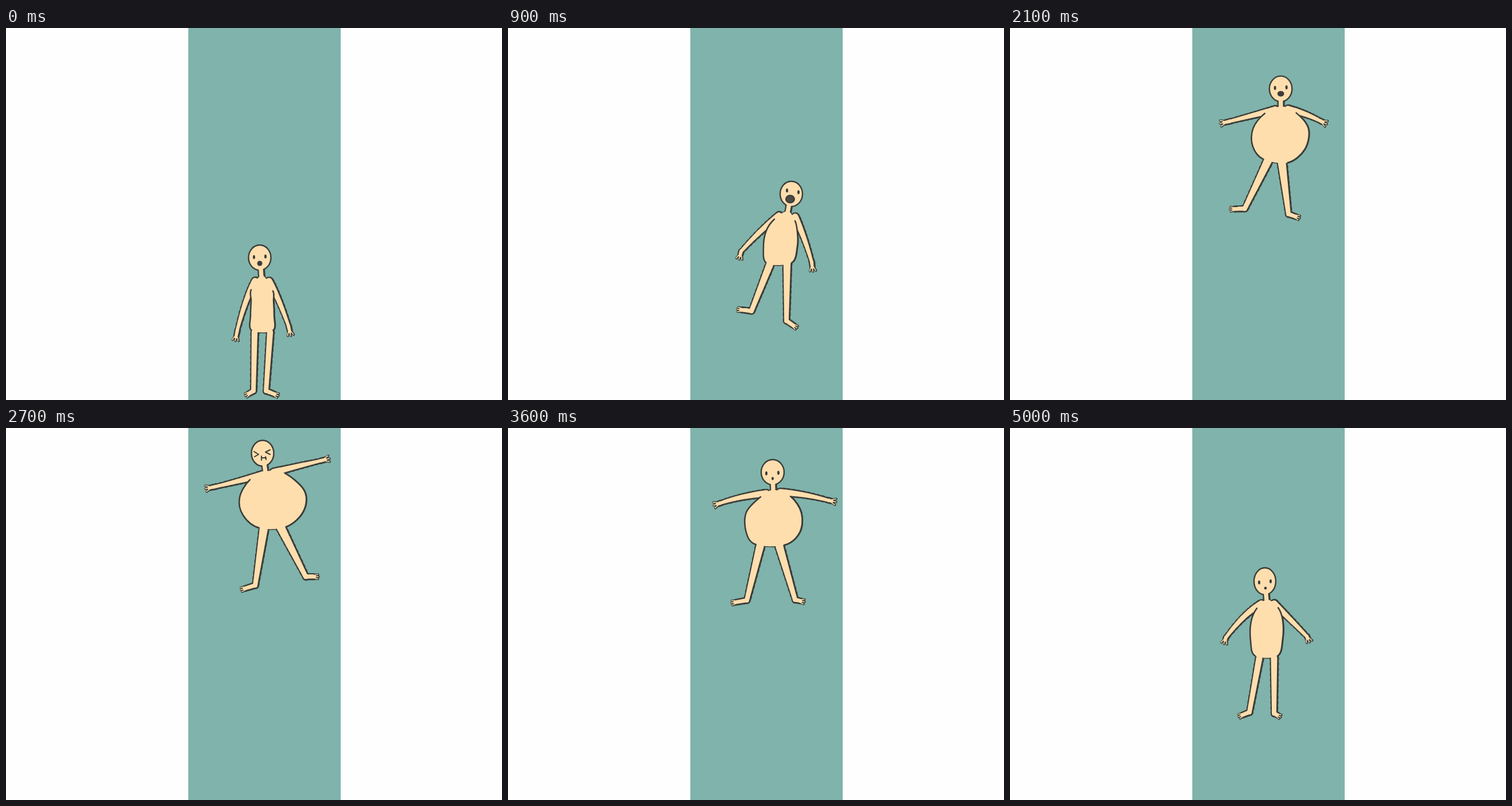
Write an HTML page with a canvas that moves like this. It is 864 by 648 pixels and loops after 5.1 s.

```html
<!DOCTYPE html>
<html lang="en">
<head>
<meta charset="utf-8">
<title>Floating up</title>
<style>
html, body { margin: 0; width: 100%; height: 100%; overflow: hidden; background: #fffeff; }
canvas { display: block; }
</style>
</head>
<body>
<canvas id="stage" width="864" height="648"></canvas>
<script>
const ctx = document.getElementById('stage').getContext('2d');
const PAPER = '#fffeff', TEAL = '#7fb3ab', SKIN = '#ffdeae', INK = '#3b3d39';
const HOLD = 300, LOOP = 5100, EDGE = 1.3;

// torso: top, left pit, left side, left low, left hip, then mirrored upwards
// arms: shoulder, bend, wrist, fingertips; legs: hip, ankle, toes
const stand = {
  head: [442, 400, 19.5, 22], eyes: [432, 399, 452, 398], mouth: [442, 410, 4.5, 4.5], neck: [445, 432],
  torso: [446, 431, 427, 456, 427, 475, 426, 500, 428, 527, 465, 527, 467, 500, 466, 475, 465, 458],
  armL: [434, 441, 417, 470, 403, 526, 399, 546], armR: [458, 441, 474, 467, 492, 519, 496, 537],
  legL: [433, 530, 431, 632, 416, 641], legR: [460, 530, 453, 632, 475, 641], hip: [6.5]
};
const lean = {
  head: [493.5, 289, 19.5, 22], eyes: [486, 283, 506, 286], mouth: [491.5, 298, 8.5, 7.5], neck: [487, 320],
  torso: [487, 319, 464, 333, 450, 353, 445, 382, 451, 410, 494, 409, 504, 380, 504, 355, 500, 336],
  armL: [472, 327, 442, 349, 406, 389, 402, 404], armR: [500, 329, 516, 362, 529, 408, 531, 425],
  legL: [456, 412, 424, 493, 398, 490], legR: [486, 412, 485, 510, 504, 523], hip: [7.5]
};
const tilt = {
  head: [505.5, 191.5, 20, 22], eyes: [497, 185, 517, 188], mouth: [503, 201, 8.5, 7.5], neck: [499, 222],
  torso: [495, 222, 470, 230, 446, 250, 436, 280, 442, 304, 478, 321, 507, 303, 520, 267, 516, 243],
  armL: [482, 227, 455, 232, 408, 246, 391, 250], armR: [509, 230, 525, 259, 533, 308, 536, 326],
  legL: [450, 308, 374, 371, 346, 362], legR: [466, 318, 434, 414, 450, 431], hip: [8]
};
const ball = {
  head: [447, 44, 19.5, 22.5], eyes: [436, 46, 456, 42], mouth: [449, 52, 4, 3], neck: [452, 75],
  torso: [456, 75, 425, 90, 407, 121, 413, 152, 441, 174, 488, 172, 518, 145, 520, 110, 486, 79],
  armL: [447, 81, 412, 91, 365, 102, 346, 106], armR: [466, 77, 505, 67, 548, 57, 564, 53],
  legL: [449, 175, 434, 274, 408, 282], legR: [479, 174, 522, 259, 545, 259], hip: [8.5]
};
const star = {
  head: [461, 77, 20, 22], eyes: [450, 79, 471, 78], mouth: [461, 88, 2, 2.8], neck: [462, 107],
  torso: [462, 108, 440, 120, 415, 147, 415, 182, 432, 203, 481, 204, 508, 182, 511, 148, 492, 119],
  armL: [450, 114, 407, 118, 369, 131, 357, 135], armR: [474, 112, 515, 114, 558, 126, 572, 129],
  legL: [439, 206, 416, 300, 388, 305], legR: [473, 207, 500, 299, 517, 303], hip: [8]
};
const drop = {
  head: [452.5, 169, 19.5, 23], eyes: [442, 171, 463, 169], mouth: [453, 181, 2.8, 2.5], neck: [456, 201],
  torso: [456, 201, 437, 216, 421, 242, 421, 275, 438, 300, 479, 299, 494, 272, 495, 241, 479, 214],
  armL: [446, 208, 412, 226, 371, 252, 361, 262], armR: [469, 207, 495, 219, 532, 254, 538, 267],
  legL: [446, 304, 419, 395, 394, 402], legR: [471, 303, 484, 399, 503, 407], hip: [8]
};
const land = {
  head: [444, 267, 19, 23.5], eyes: [434, 269, 454, 267], mouth: [445, 279, 2.4, 2.4], neck: [447, 299],
  torso: [448, 299, 430, 314, 420, 337, 419, 370, 427, 397, 466, 397, 475, 367, 475, 335, 467, 313],
  armL: [438, 306, 408, 322, 376, 365, 372, 377], armR: [460, 306, 484, 329, 517, 363, 522, 374],
  legL: [434, 402, 417, 495, 397, 503], legR: [460, 401, 460, 497, 472, 504], hip: [6.8]
};

// from, to, blend, shift x, shift y
const beats = [
  [stand], [stand, lean, .18, -4], [stand, lean, .44, -13],
  [lean], [lean, tilt, .5],
  [tilt], [tilt, ball, .27], [tilt, ball, .58], [tilt, ball, .87],
  [ball], [ball, star, .2, 0, -9], [ball, star, .6, 0, -8],
  [star], [star, drop, .5],
  [drop], [drop, land, .5],
  [land]
];

function blend(a, b, k) {
  const pose = {};
  for (const part in a) pose[part] = a[part].map((v, i) => v + (b[part][i] - v) * k);
  return pose;
}

function ellipse(x, y, rx, ry) {
  ctx.beginPath();
  ctx.ellipse(x, y, rx, ry, 0, 0, Math.PI * 2);
}

function line(...xy) {
  ctx.beginPath();
  for (let i = 0; i < xy.length; i += 2) ctx.lineTo(xy[i], xy[i + 1]);
  ctx.stroke();
}

// Tapered, slightly uneven quadratic limb
function limb(x0, y0, cx, cy, x1, y1, r0, r1, grow) {
  ctx.beginPath();
  for (let i = 0; i <= 70; i++) {
    const t = i / 70, u = 1 - t;
    const x = u * u * x0 + 2 * u * t * cx + t * t * x1;
    const y = u * u * y0 + 2 * u * t * cy + t * t * y1;
    const rough = grow > 0 ? .3 * Math.sin(i * .9 + x0) : 0;
    const r = r0 + (r1 - r0) * t + grow + rough;
    ctx.moveTo(x + r, y);
    ctx.arc(x, y, r, 0, Math.PI * 2);
  }
  ctx.fill();
}

function straight(x0, y0, x1, y1, r0, r1, grow) {
  limb(x0, y0, (x0 + x1) / 2, (y0 + y1) / 2, x1, y1, r0, r1, grow);
}

// Palm or sole ending in three digits
function digits(x0, y0, x1, y1, r, spread, grow) {
  const len = Math.hypot(x1 - x0, y1 - y0);
  const ux = (x1 - x0) / len, uy = (y1 - y0) / len;
  const reach = Math.max(len - 8, 2);
  const bx = x0 + ux * reach, by = y0 + uy * reach;
  straight(x0, y0, bx, by, r, r - .4, grow);
  ctx.lineWidth = grow > 0 ? 4.2 : 1.5;
  for (const side of [-1, 0, 1]) {
    const a = side * 2.6, b = side * spread, tip = 7 - Math.abs(side);
    line(bx - uy * a, by + ux * a, bx + ux * tip - uy * b, by + uy * tip + ux * b);
  }
}

function arm(a, grow) {
  limb(a[0], a[1], a[2], a[3], a[4], a[5], 7, 4, grow);
  digits(a[4], a[5], a[6], a[7], 4.3, 5.2, grow);
}

function leg(l, hip, grow) {
  straight(l[0], l[1], l[2], l[3], hip, 5.2, grow);
  digits(l[2], l[3], l[4], l[5], 4.8, 3.8, grow);
}

// Smooth closed curve, or the part of it between two of its points
function curve(p, first = 0, last = p.length / 2) {
  const n = p.length / 2;
  const at = i => { const j = (i + n) % n * 2; return [p[j], p[j + 1]]; };
  ctx.beginPath();
  ctx.moveTo(...at(first));
  for (let i = first; i < last; i++) {
    const [a, b, c, d] = [at(i - 1), at(i), at(i + 1), at(i + 2)];
    ctx.bezierCurveTo(b[0] + (c[0] - a[0]) / 6, b[1] + (c[1] - a[1]) / 6,
      c[0] - (d[0] - b[0]) / 6, c[1] - (d[1] - b[1]) / 6, c[0], c[1]);
  }
}

function neck(p, grow) {
  const [hx, hy, , ry] = p.head, [nx, ny] = p.neck;
  straight(hx + (nx - hx) * .65, hy + ry - 2, nx, ny + 2, 5, 5, grow);
}

function ink(color) {
  ctx.fillStyle = ctx.strokeStyle = color;
}

function drawFace(p, squint) {
  const [lx, ly, rx, ry] = p.eyes, [mx, my, mw, mh] = p.mouth;
  ink(INK);
  if (squint) {
    ctx.lineWidth = 2;
    line(lx - 4, ly - 5, lx + 4, ly, lx - 3, ly + 4);
    line(rx + 4, ry - 4, rx - 4, ry, rx + 4, ry + 4);
    line(mx - 4, my - 3, mx - 4, my + 4);
    line(mx - 4, my, mx + 4, my);
    line(mx + 3, my - 2, mx + 4, my + 3);
    return;
  }
  ellipse(lx, ly, 2, 3.6); ctx.fill();
  ellipse(rx, ry, 2, 3.6); ctx.fill();
  ellipse(mx, my, mw, mh); ctx.fill();
  if (mw > 6) {
    ctx.fillStyle = '#4f4a44';
    ellipse(mx, my, mw - 2.5, mh - 2.5); ctx.fill();
  }
}

function drawFigure(p, squint) {
  // Ink silhouette, a little heavier on the right
  ctx.save();
  ctx.translate(.5, .1);
  ink(INK);
  for (const a of [p.armL, p.armR]) arm(a, EDGE);
  for (const l of [p.legL, p.legR]) leg(l, p.hip[0], EDGE);
  neck(p, EDGE);
  ctx.lineWidth = 2 * EDGE;
  curve(p.torso); ctx.fill(); ctx.stroke();
  ctx.restore();

  ink(SKIN);
  for (const a of [p.armL, p.armR]) arm(a, -EDGE);
  curve(p.torso); ctx.fill();
  ctx.strokeStyle = INK;
  ctx.lineWidth = 2.5;
  curve(p.torso, 1, 4); ctx.stroke();
  curve(p.torso, 5, 8); ctx.stroke();
  ink(SKIN);
  for (const l of [p.legL, p.legR]) leg(l, p.hip[0], -EDGE);

  ellipse(...p.head); ctx.fill();
  ctx.strokeStyle = INK;
  ctx.lineWidth = 2.4;
  ctx.stroke();
  ink(SKIN);
  neck(p, -EDGE);
  drawFace(p, squint);
}

function draw() {
  const beat = Math.floor(performance.now() % LOOP / HOLD);
  const [from, to = from, k = 0, dx = 0, dy = 0] = beats[beat];
  ctx.fillStyle = PAPER;
  ctx.fillRect(0, 0, 864, 648);
  ctx.fillStyle = TEAL;
  ctx.fillRect(317.5, 0, 265.5, 648);
  ctx.lineCap = ctx.lineJoin = 'round';
  ctx.save();
  ctx.translate(dx, dy);
  drawFigure(blend(from, to, k), beat === 9 || beat === 10);
  ctx.restore();
  requestAnimationFrame(draw);
}
draw();
</script>
</body>
</html>
```
